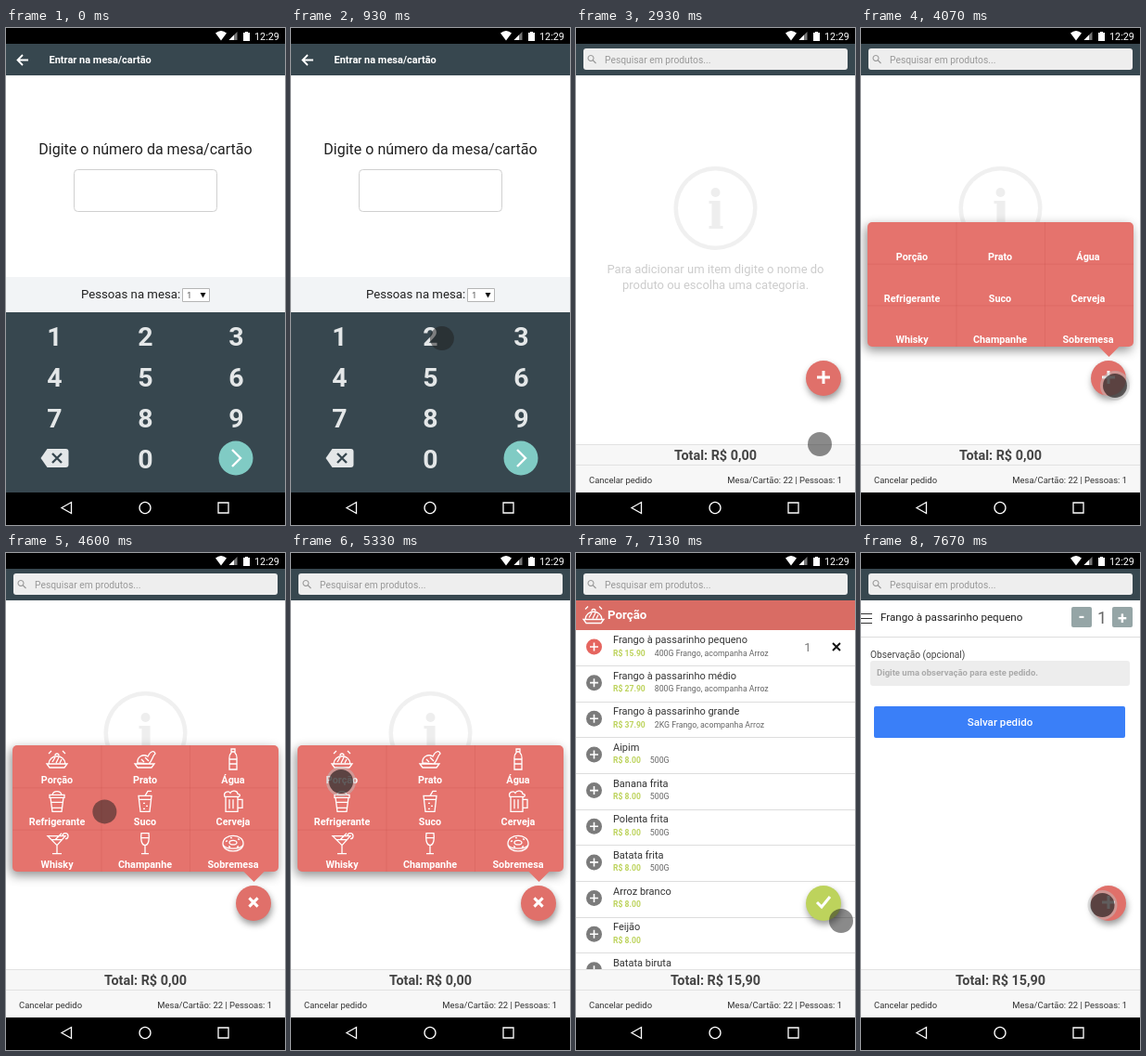
These frames come from a looping animation (301 by 535 pixels, 8000 ms). An HTML page with a canvas:

```html
<!DOCTYPE html>
<html lang="pt-BR">
<head>
<meta charset="utf-8">
<title>Pedido na mesa</title>
<style>
html, body { margin: 0; width: 100%; height: 100%; overflow: hidden; background: #fff; }
canvas { display: block; }
</style>
</head>
<body>
<canvas id="stage" width="301" height="535"></canvas>
<script>
const ctx = document.getElementById('stage').getContext('2d');
const LOOP = 8000;
const SLATE = '#37474f', RED = '#e0706a', LIME = '#bdd35c';

// --- drawing helpers ---
function text(s, x, y, size, color, weight = 400, align = 'left') {
  ctx.font = `${weight} ${size}px Roboto, sans-serif`;
  ctx.textAlign = align;
  ctx.fillStyle = color;
  ctx.fillText(s, x, y);
  return ctx.measureText(s).width;
}
function rect(x, y, w, h, color) {
  ctx.fillStyle = color;
  ctx.fillRect(x, y, w, h);
}
function box(x, y, w, h, r, fill, stroke) {
  ctx.beginPath();
  ctx.roundRect(x, y, w, h, r);
  if (fill) { ctx.fillStyle = fill; ctx.fill(); }
  if (stroke) { ctx.strokeStyle = stroke; ctx.lineWidth = 1; ctx.stroke(); }
}
function disc(x, y, r, color) {
  ctx.beginPath();
  ctx.arc(x, y, r, 0, 7);
  ctx.fillStyle = color;
  ctx.fill();
}
function shape(d, x, y, color, width = 0, angle = 0) {
  ctx.save();
  ctx.translate(x, y);
  ctx.rotate(angle);
  const p = new Path2D(d);
  if (width) { ctx.strokeStyle = color; ctx.lineWidth = width; ctx.stroke(p); }
  else { ctx.fillStyle = color; ctx.fill(p); }
  ctx.restore();
}
function withShadow(color, blur, dx, dy, draw) {
  ctx.save();
  ctx.shadowColor = color;
  ctx.shadowBlur = blur;
  ctx.shadowOffsetX = dx;
  ctx.shadowOffsetY = dy;
  draw();
  ctx.restore();
}
const clamp = v => Math.max(0, Math.min(1, v));
const ease = v => v * v * (3 - 2 * v);

// --- shared chrome ---
const PLUS = 'M-7 0H7M0 -7V7';

function systemBars() {
  rect(0, 0, 301, 17, '#000');
  shape('M-6 -3Q0 -8 6 -3L0 5Z', 232, 8.5, '#fff');
  shape('M0 0V-9L-9 0Z', 249.5, 13, '#777');
  shape('M-3.5 0V-5.5L-9 0Z', 249.5, 13, '#fff');
  rect(256, 5, 7, 9, '#fff');
  rect(258, 4, 3, 1, '#fff');
  text('12:29', 268, 13, 10.8, '#fff');
  rect(0, 500, 301, 35, '#000');
  shape('M-5 0L5.5 -6V6Z', 65, 516.5, '#fff', 1.3);
  shape('M6 0A6 6 0 1 1 6 -.01Z', 150, 516.5, '#fff', 1.3);
  shape('M-5.5 -5.5H5.5V5.5H-5.5Z', 234.5, 516.5, '#fff', 1.3);
}

function searchBar() {
  rect(0, 17, 301, 34, SLATE);
  box(8, 22, 285, 23, 3, '#eee');
  shape('M2 -1A3 3 0 1 1 2 -1.01ZM1 1L4.5 4.5', 17, 33.5, '#999', 1.1);
  text('Pesquisar em produtos...', 31, 38, 10.3, '#999');
}

function footer(total) {
  rect(0, 448, 301, 52, '#f7f7f7');
  rect(0, 448, 301, 1, '#e2e2e2');
  rect(0, 470, 301, 1, '#e2e2e2');
  text('Total: R$ ' + total, 150.5, 465, 14.4, '#444', 700, 'center');
  text('Cancelar pedido', 14, 490, 9.45, '#333');
  text('Mesa/Cartão: 22 | Pessoas: 1', 287, 490, 9.45, '#333', 400, 'right');
}

function fab(color, icon, angle = 0) {
  withShadow('rgba(0,0,0,.4)', 7, 1, 4, () => disc(267, 377, 19, color));
  shape(icon, 267, 376, '#fff', 3, angle);
}

// --- screens ---
function keypadScreen(t) {
  rect(0, 17, 301, 34, SLATE);
  shape('M6 0H-5M0 -5.5L-5.5 0L0 5.5', 18, 34.5, '#fff', 1.8);
  text('Entrar na mesa/cartão', 46.5, 38, 11, '#fff', 700);
  text('Digite o número da mesa/cartão', 150.5, 136, 16, '#212121', 400, 'center');
  box(73.5, 152.5, 154, 45, 4, '#fff', '#d0d0d0');
  text(t < 1200 ? '' : t < 1330 ? '2' : '22', 150.5, 182, 18, '#222', 400, 'center');

  rect(0, 268, 301, 38, '#f2f4f6');
  text('Pessoas na mesa:', 81, 291, 13.2, '#212121');
  box(190.5, 280.5, 29, 14, 0, '#fff', '#b5b5b5');
  text('1', 195, 291, 9.5, '#555');
  shape('M-3 -2.5H3L0 3Z', 212.5, 287.5, '#111');

  rect(0, 306, 301, 194, SLATE);
  for (let i = 0; i < 10; i++) {
    const col = i < 9 ? i % 3 : 1, row = i / 3 | 0;
    text((i + 1) % 10, 52.5 + 98 * col, 342 + 44 * row, 28.5, '#e4e7e8', 700, 'center');
  }
  shape('M-15 0L-8 -10H12Q15 -10 15 -7V7Q15 10 12 10H-8Z', 52.5, 463, '#e4e7e8');
  shape('M-5 -5L5 5M5 -5L-5 5', 55, 463, SLATE, 2.4);
  disc(248, 463, 18.5, '#80cbc4');
  shape('M-4 -9L5 0L-4 9', 248, 463, '#fff', 2.4);
}

const CATEGORIES = [
  ['Porção', 'M-11 5H11L8 9H-8ZM-9 5C-8 -6 8 -6 9 5M-2 -4A2 2 0 1 1 2 -4M-5 3L-2 -2M-1 4L2 -2M3 4L5 0M-9 -6L-6 -9M9 -6L6 -9'],
  ['Prato', 'M-8 4C-9 -3 -2 -6 3 -3C6 -9 10 -10 11 -6C8 -4 8 2 4 5ZM-4 0L-1 3M0 -2L4 2M-11 5H10L7 9H-8Z'],
  ['Água', 'M-2 -11H2V-7C5 -4 4 -2 4 0V11H-4V0C-4 -2 -5 -4 -2 -7ZM-4 0H4M-4 5H4M-2 -8H2'],
  ['Refrigerante', 'M-8 -7H8V-4H-8ZM-7 -4L-5 11H5L7 -4M-6 1H6M-5 7H5M-5 -7C-4 -12 4 -12 5 -7'],
  ['Suco', 'M-7 -6H7L5 11H-5ZM-6 -2H6M0 -6L3 -11H7M-2 2H0M1 5H3M-2 8H0'],
  ['Cerveja', 'M-8 -5V11H5V-5M5 -2H10V7H5M-9 -5C-11 -10 -5 -12 -3 -9C-1 -13 5 -11 5 -8C9 -8 7 -4 5 -5ZM-4 -2V8M0 -2V8'],
  ['Whisky', 'M-10 -8H9L0 2ZM0 2V11M-5 11H5M-6 -4H5M-2 -4L5 -11M6 -8A3 3 0 1 1 9 -5'],
  ['Champanhe', 'M-4 -11H4C5 -2 3 2 0 2C-3 2 -5 -2 -4 -11ZM0 2V11M-4 11H4M-4 -6H4'],
  ['Sobremesa', 'M-11 0C-11 -11 11 -11 11 0C11 11 -11 11 -11 0ZM-11 1C-9 7 9 7 11 1M-4 -1C-4 -4 4 -4 4 -1C4 2 -4 2 -4 -1ZM-8 -2L-6 -3M-3 -6H-1M5 -5L7 -4M-5 3L-3 4M4 4L6 3']
];

function categoryMenu(open) {
  const top = 209 - 2 * open, step = (343 - top) / 3;
  withShadow('rgba(0,0,0,.45)', 12, -2, 4, () => box(7, top, 287, 343 - top, 5, '#e5736d'));
  shape('M-11 0H11L0 11Z', 267.5, 343, '#e5736d');
  for (let i = 1; i < 3; i++) {
    rect(7 + 95.5 * i, top, 1, 343 - top, 'rgba(190,70,65,.2)');
    rect(7, top + step * i, 287, 1, 'rgba(190,70,65,.2)');
  }
  CATEGORIES.forEach(([name, icon], i) => {
    const x = 55 + 95 * (i % 3), y = top + step * (i / 3 | 0);
    text(name, x, y + 41, 10.8, '#fff', 700, 'center');
    ctx.globalAlpha = open;
    shape(icon, x, y + 15, '#fff', 1.3);
    ctx.globalAlpha = 1;
  });
}

function homeScreen(t) {
  disc(150.5, 194, 45, '#f0f0f0');
  disc(150.5, 194, 40.5, '#fff');
  disc(150.5, 177, 5, '#eee');
  shape('M-7 -9H5V18H8V21H-7V18H-4V-6H-7Z', 150.5, 195, '#eee');
  text('Para adicionar um item digite o nome do', 150.5, 264, 13, '#ccc', 400, 'center');
  text('produto ou escolha uma categoria.', 150.5, 281, 13, '#ccc', 400, 'center');
  const open = clamp((t - 4070) / 200);
  if (t >= 4065) categoryMenu(open);
  fab(RED, open < 1 ? PLUS : 'M-6.5 0H6.5M0 -6.5V6.5', open * Math.PI / 4);
}

const ITEMS = [
  ['Frango à passarinho pequeno', '15.90', '400G Frango, acompanha Arroz'],
  ['Frango à passarinho médio', '27.90', '800G Frango, acompanha Arroz'],
  ['Frango à passarinho grande', '37.90', '2KG Frango, acompanha Arroz'],
  ['Aipim', '8.00', '500G'],
  ['Banana frita', '8.00', '500G'],
  ['Polenta frita', '8.00', '500G'],
  ['Batata frita', '8.00', '500G'],
  ['Arroz branco', '8.00', ''],
  ['Feijão', '8.00', ''],
  ['Batata biruta', '8.00', '']
];

function listScreen(t) {
  const added = t >= 6270;
  ITEMS.forEach(([name, price, note], i) => {
    const y = 83 + 38.65 * i;
    disc(19.5, y + 18, 8.5, added && !i ? '#e5655f' : '#7b7b7b');
    shape('M-4.5 0H4.5M0 -4.5V4.5', 19.5, y + 18, '#fff', 1.6);
    text(name, 40, y + 14, 11, '#333');
    const w = text('R$ ' + price, 40, y + 27.5, 8.6, LIME, 700);
    text(note, 50 + w, y + 27.5, 8.75, '#666');
    rect(0, Math.round(y + 38), 301, 1, '#ddd');
  });
  rect(0, 50, 301, 33, '#d96c64');
  shape(CATEGORIES[0][1], 19, 66.5, '#fff', 1.3);
  text('Porção', 34, 71, 13.3, '#fff', 700);
  if (added) {
    text('1', 250, 105.5, 13, '#777', 400, 'center');
    shape('M-4 -4L4 4M4 -4L-4 4', 281, 101, '#111', 1.9);
  }
  if (added) fab(LIME, 'M-7 0L-2 5L7 -6');
  else fab(RED, PLUS);
}

function orderScreen() {
  rect(0, 90, 301, 1, '#ddd');
  for (let y = 65; y < 76; y += 5) rect(0, y, 12, 1, '#333');
  text('Frango à passarinho pequeno', 21, 73, 11.65, '#222');
  box(227, 58, 22, 22, 2, '#95a5a6');
  box(271, 58, 22, 22, 2, '#95a5a6');
  text('-', 238, 75, 18, '#fff', 700, 'center');
  text('+', 282, 76, 18, '#fff', 700, 'center');
  text('1', 260, 76, 18, '#666', 400, 'center');
  text('Observação (opcional)', 10, 113, 10.2, '#444');
  box(10, 116, 280, 27, 3, '#ededed');
  text('Digite uma observação para este pedido.', 17, 132, 9.5, '#aaa', 700);
  box(14, 165, 271, 34, 2, '#3a7ff8');
  text('Salvar pedido', 150, 186, 11.6, '#fff', 500, 'center');
  fab(RED, PLUS);
}

// --- touch pointer: time, x, y ---
const PATH = [
  [140, 312, 548], [1000, 160, 330], [1400, 160, 330], [1730, 277, 471],
  [1800, 277, 471], [1930, 265, 477], [2860, 265, 477], [2930, 263, 448],
  [3270, 275, 387], [3400, 275, 387], [3470, 274, 385], [4070, 274, 385],
  [4870, 46, 240], [5000, 46, 250], [5200, 46, 250], [5270, 54, 246],
  [5390, 54, 246], [5930, 27, 109], [6400, 27, 109], [6530, 129, 118],
  [6735, 129, 118], [6800, 195, 180], [7130, 286, 396], [7190, 286, 396],
  [7330, 261, 379], [8000, 260, 379]
];
const PRESSES = [[990, 1420], [2065, 2400], [3530, 4130], [4990, 5400], [6260, 6440], [7320, 8000]];

function pointer(t) {
  if (t < 140 || (t >= 6865 && t < 7125)) return;
  const i = PATH.findIndex(p => p[0] > t);
  const [t0, x0, y0] = PATH[i - 1], [t1, x1, y1] = PATH[i];
  const k = ease((t - t0) / (t1 - t0));
  const x = x0 + (x1 - x0) * k, y = y0 + (y1 - y0) * k;
  if (PRESSES.some(([a, b]) => t >= a && t < b)) {
    disc(x, y, 16, 'rgba(190,190,190,.5)');
    disc(x, y, 13, 'rgba(20,15,15,.62)');
  } else {
    disc(x, y, 13, 'rgba(30,30,30,.52)');
  }
}

function draw(now) {
  const t = now % LOOP;
  rect(0, 0, 301, 535, '#fff');
  if (t < 2395) {
    keypadScreen(t);
  } else {
    if (t < 5395) homeScreen(t);
    else if (t < 7595) listScreen(t);
    else orderScreen();
    searchBar();
    footer(t < 6400 ? '0,00' : '15,90');
  }
  systemBars();
  pointer(t);
}

let start;
function tick(now) {
  start ??= now;
  draw(now - start);
  requestAnimationFrame(tick);
}
draw(0);
requestAnimationFrame(tick);
</script>
</body>
</html>
```
